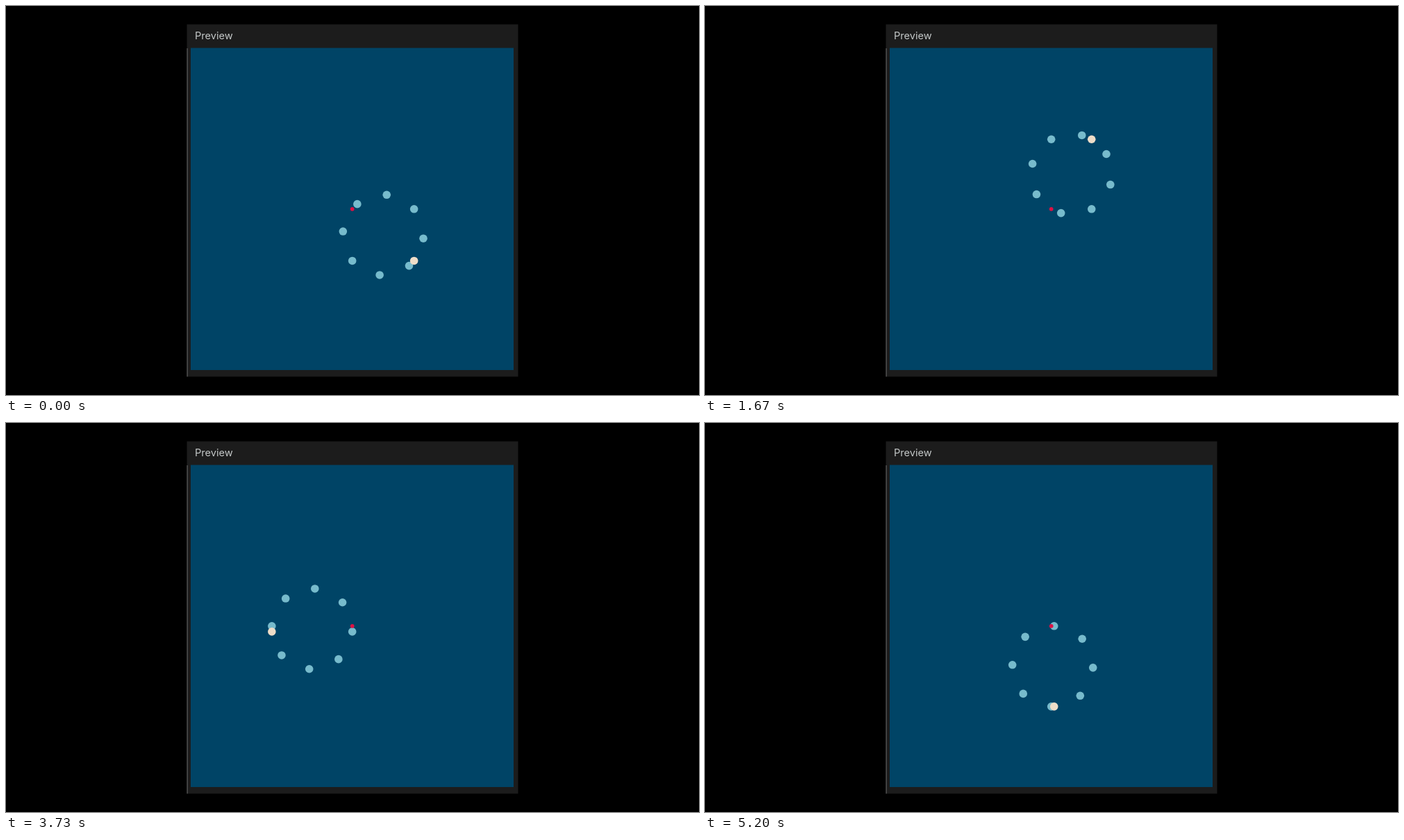
An HTML page that plays this animation: 998x561 px, repeating every 5270 ms.

```html
<!DOCTYPE html>
<html lang="en">
<head>
<meta charset="utf-8">
<title>Rolling circle</title>
<style>
  html, body { margin: 0; width: 100%; height: 100%; overflow: hidden; background: #000; }
  svg { display: block; width: 998px; height: 561px; }
  text { font: 400 14.6px Inter, "Open Sans", sans-serif; fill: #c4c8c8; }
</style>
</head>
<body>
<svg viewBox="0 0 998 561">
  <rect x="260.5" y="26.5" width="477" height="508" fill="#1c1c1c"/>
  <rect x="260.5" y="61" width="1.2" height="473.5" fill="#5c5c5c"/>
  <text x="272" y="48.4">Preview</text>
  <rect x="266" y="60.5" width="465" height="464.5" fill="#004466"/>
  <g id="dots"></g>
</svg>
<script>
const LOOP = 5270;
const STEP = 200 / 3;        // ms per step
const TURN = 4;              // degrees per step
const START = 40;
const ORIGIN = { x: 498.7, y: 292.8 };
const RADIUS = 58.06;
const COUNT = 8;

const layer = document.getElementById("dots");

function addDot(r, fill) {
  const dot = document.createElementNS("http://www.w3.org/2000/svg", "circle");
  dot.setAttribute("r", r);
  dot.setAttribute("fill", fill);
  layer.append(dot);
  return dot;
}

function place(dot, p) {
  dot.setAttribute("cx", p.x.toFixed(2));
  dot.setAttribute("cy", p.y.toFixed(2));
}

function polar(from, degrees) {
  const a = degrees * Math.PI / 180;
  return { x: from.x + RADIUS * Math.cos(a), y: from.y + RADIUS * Math.sin(a) };
}

const ring = Array.from({ length: COUNT }, () => addDot(5.8, "#77bbcc"));
const lead = addDot(5.8, "#eeddc8");
place(addDot(2.9, "#dd1144"), ORIGIN);

// Steps begin on whole hundredths of a second.
const stepStart = n => Math.round(n * STEP / 10) * 10;

function stepAt(t) {
  const n = Math.round(t / STEP);
  return stepStart(n) <= t ? n : n - 1;
}

// The small circle rolls inside one twice its size, so each ring dot runs along a straight line.
function draw(t) {
  const angle = START - TURN * stepAt(t);
  const center = polar(ORIGIN, angle);
  ring.forEach((dot, k) => place(dot, polar(center, k * 360 / COUNT - angle)));
  place(lead, polar(center, angle));
}

const begin = performance.now();
function tick() {
  draw((performance.now() - begin) % LOOP);
  requestAnimationFrame(tick);
}
draw(0);
requestAnimationFrame(tick);
</script>
</body>
</html>
```
